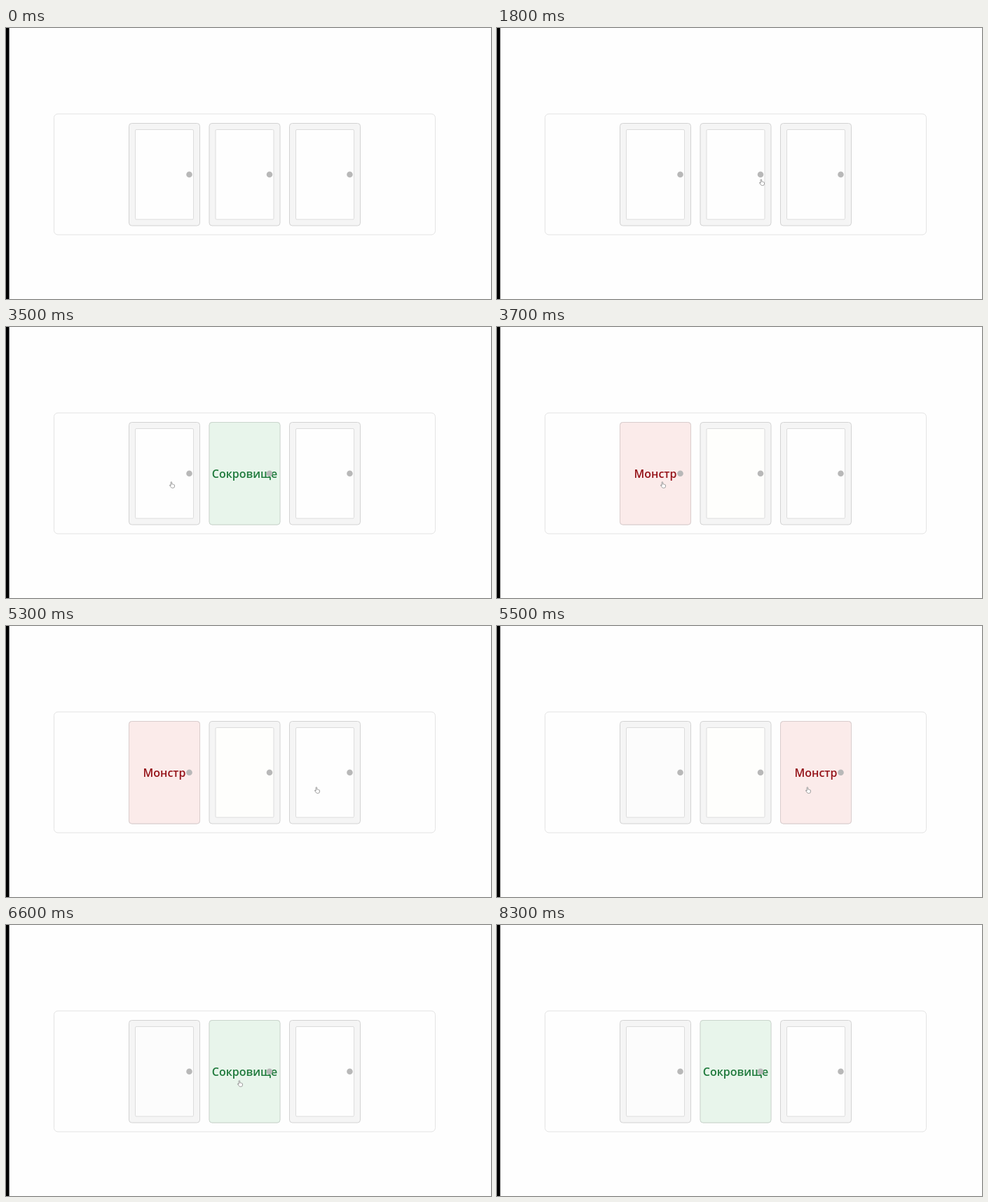
Animation of 692x388 px, one loop 9200 ms. Source, as an HTML page:

```html
<!DOCTYPE html>
<html lang="ru">
<head>
<meta charset="utf-8">
<title>Три двери</title>
<style>
  html, body { margin: 0; width: 100%; height: 100%; overflow: hidden; background: #fefefe; }
  svg { display: block; width: 692px; height: 388px; }
  text { font: 600 16px "Open Sans", "Noto Sans", sans-serif; text-anchor: middle; }

  .stage { fill: #fefefe; stroke: #e3e3e3; }
  .frame { fill: #f5f5f5; stroke: #d2d2d2; }
  .panel { fill: #fefefe; stroke: #dcdcdc; }
  .knob { fill: #b8b8b8; }
  .monster rect { fill: #fbebea; stroke: #d9cccc; }
  .monster text { fill: #951319; }
  .treasure rect { fill: #e8f5eb; stroke: #c9d5cc; }
  .treasure text { fill: #1f7a3c; }
  .cursor path { fill: #fff; stroke: #858585; stroke-width: .8; stroke-linejoin: round; }

  /* 1% = 92 ms */
  .a { animation: 9.2s step-end -5ms infinite; }
  .open1 { animation-name: open1; }
  .open2 { animation-name: open2; }
  .open3 { animation-name: open3; }
  .tint1 { animation-name: tint1; }
  .tint2 { animation-name: tint2; }
  .show { animation-name: show; }
  .arrow { animation-name: arrow; }
  .hand { animation-name: hand; }
  .cursor { animation: move 9.2s linear -5ms infinite; }

  @keyframes open1 { 0%, 59.783% { opacity: 0 } 40.217% { opacity: 1 } }
  @keyframes open2 { 0%, 40.217% { opacity: 0 } 25%, 71.739% { opacity: 1 } }
  @keyframes open3 { 0%, 71.739% { opacity: 0 } 59.783% { opacity: 1 } }
  @keyframes tint1 { 0% { fill: #fefefe } 59.783%, 100% { fill: #fcfcfc } }
  @keyframes tint2 { 0% { fill: #fefefe } 40.217%, 100% { fill: #fefefc } }
  @keyframes show { 0%, 85.87% { opacity: 0 } 9.783% { opacity: 1 } 84.783% { opacity: .5 } }
  @keyframes arrow { 0% { opacity: 1 } 18.478%, 100% { opacity: 0 } }
  @keyframes hand { 0% { opacity: 0 } 18.478%, 100% { opacity: 1 } }

  /* the pointer advances once every 100 ms */
  @keyframes move {
    0%, 14.13% { transform: translate(595px, 323px); animation-timing-function: steps(2) }
    16.304% { transform: translate(567px, 300px); animation-timing-function: steps(2) }
    18.478% { transform: translate(440px, 240px); animation-timing-function: steps(1) }
    19.565% { transform: translate(378px, 221px); animation-timing-function: steps(2) }
    21.739% { transform: translate(264px, 217px); animation-timing-function: steps(2) }
    23.913% { transform: translate(340px, 224px); animation-timing-function: steps(1) }
    25%, 31.522% { transform: translate(354px, 226px); animation-timing-function: steps(1) }
    32.609% { transform: translate(348px, 224px); animation-timing-function: steps(2) }
    34.783% { transform: translate(302px, 217px); animation-timing-function: steps(2) }
    36.957% { transform: translate(247px, 223px); animation-timing-function: steps(1) }
    38.043%, 45.652% { transform: translate(237px, 226px); animation-timing-function: steps(2) }
    47.826% { transform: translate(252px, 219px); animation-timing-function: steps(2) }
    50% { transform: translate(280px, 217px); animation-timing-function: steps(2) }
    52.174% { transform: translate(312px, 220px); animation-timing-function: steps(1) }
    53.261% { transform: translate(352px, 232px); animation-timing-function: steps(1) }
    54.348% { transform: translate(400px, 234px); animation-timing-function: steps(2) }
    56.522% { transform: translate(435px, 234px); animation-timing-function: steps(1) }
    57.609%, 60.87% { transform: translate(444px, 235px); animation-timing-function: steps(2) }
    63.043% { transform: translate(432px, 233px); animation-timing-function: steps(4) }
    67.391% { transform: translate(352px, 228px); animation-timing-function: steps(2) }
    69.565%, 100% { transform: translate(334px, 227px) }
  }
</style>
</head>
<body>
<svg viewBox="0 0 692 388">
  <defs>
    <rect id="slab" x=".5" y=".5" width="101" height="146.5" rx="4"/>
    <rect id="inset" x="9.5" y="9.5" width="83" height="128.5" rx="1.5"/>
    <circle id="knob" cx="86.5" cy="73.7" r="4.3"/>
  </defs>

  <rect width="4.6" height="388"/>
  <rect class="stage" x="68.5" y="123" width="544" height="173" rx="5.5"/>

  <g transform="translate(175 136)">
    <use class="frame" href="#slab"/>
    <use class="panel a tint1" href="#inset"/>
    <g class="monster a open1">
      <rect x=".5" y=".5" width="101" height="146.5" rx="4"/>
      <text x="51" y="80">Монстр</text>
    </g>
    <use class="knob" href="#knob"/>
  </g>

  <g transform="translate(289.5 136)">
    <use class="frame" href="#slab"/>
    <use class="panel a tint2" href="#inset"/>
    <g class="treasure a open2">
      <rect x=".5" y=".5" width="101" height="146.5" rx="4"/>
      <text x="51" y="80">Сокровище</text>
    </g>
    <use class="knob" href="#knob"/>
  </g>

  <g transform="translate(404 136)">
    <use class="frame" href="#slab"/>
    <use class="panel" href="#inset"/>
    <g class="monster a open3">
      <rect x=".5" y=".5" width="101" height="146.5" rx="4"/>
      <text x="51" y="80">Монстр</text>
    </g>
    <use class="knob" href="#knob"/>
  </g>

  <g class="a show">
    <g class="cursor">
      <path class="a arrow" d="M-2.5-3.5V2.6L-1 1.3 0 3.5 1.1 3 .2 .9H2.3Z"/>
      <path class="a hand" d="M-1.9 1.1V-3.4Q-1.9-4.3-1.1-4.3T-.3-3.4V-.9Q.6-1.4 1.1-.7 2-1 2.4-.3 3.5-.5 3.5.6V2.2Q3.5 4.4 1.4 4.4H.2Q-1 4.4-1.7 3.3L-3.4.9Q-3.6 0-2.8 0Z"/>
    </g>
  </g>
</svg>
</body>
</html>
```
